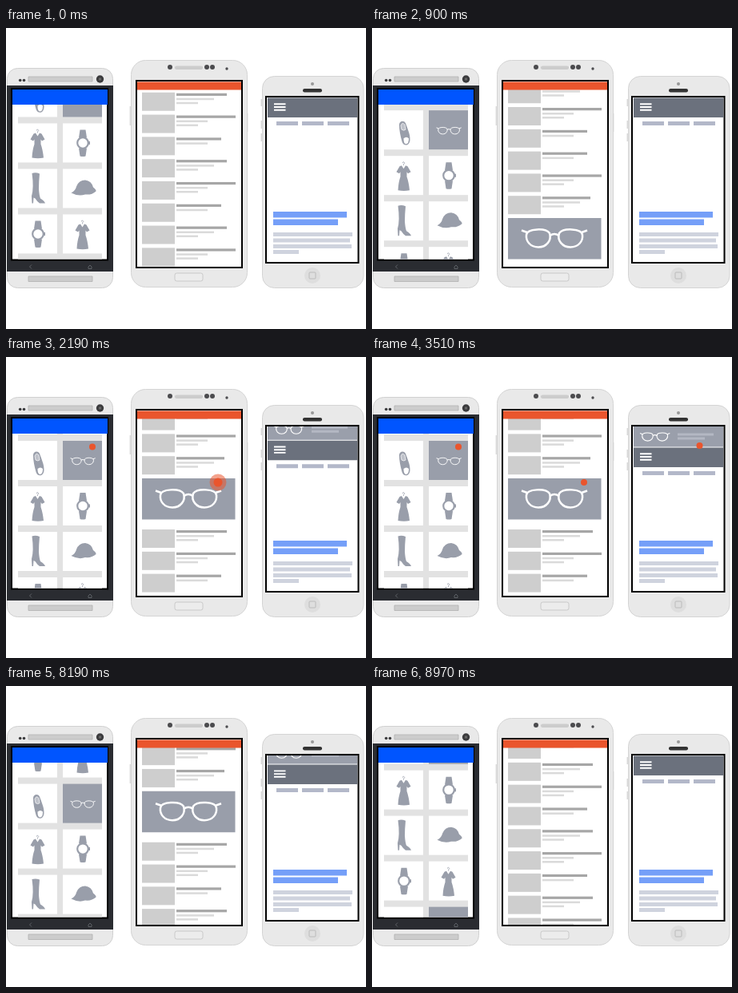
Recreate the animation shown at these times as an HTML page. Size 450 px wide and 377 px high, loop 9000 ms.

```html
<!DOCTYPE html>
<html lang="en">
<head>
<meta charset="utf-8">
<title>Three phones</title>
<style>
  html, body { margin: 0; width: 100%; height: 100%; overflow: hidden; background: #fff; }
  svg { display: block; width: 450px; height: 377px; }
</style>
</head>
<body>
<svg viewBox="0 0 450 377">
  <defs>
    <clipPath id="gridClip"><path d="M8 96H126V289.500H8Z"/></clipPath>
    <clipPath id="listClip"><path d="M164 77H294V299H164Z"/></clipPath>
    <clipPath id="pageClip"><path d="M326 87H439.500V293H326Z"/></clipPath>
    <g id="glasses" fill="none" stroke="#fff" stroke-width="2.500">
      <path d="M6 10C7 2 30 1 35 8C38 17 31 25.500 21 25.500C11 25.500 5 18 6 10ZM76 10C75 2 52 1 47 8C44 17 51 25.500 61 25.500C71 25.500 77 18 76 10Z"/>
      <path d="M35.500 11Q41 7 46.500 11M7 7L0 4.500M75 7L82 4.500"/>
    </g>
    <g id="dress" fill="#999eaa">
      <path d="M24.500 12V10.500Q27 9 24.500 7.500Q23 8 23.500 9" fill="none" stroke="#999eaa" stroke-width=".8"/>
      <path d="M19.500 13L22 12L24.500 16L27 12L29.500 13L33.500 20L30 22L28.500 20L28.500 26Q31 33 32 43Q25 44.500 17.500 43Q18 33 20.500 26L20.500 20L19 22L15.500 20Z"/>
    </g>
    <g id="watch" fill="#999eaa">
      <path d="M21.500 8H28.500L30 18H20ZM20 31H30L28.500 41Q25 42 21.500 41ZM32 22.500H34V26.500H32Z"/>
      <circle cx="25" cy="24.500" r="6.800" fill="#fff" stroke="#999eaa" stroke-width="2.200"/>
    </g>
    <path id="boot" fill="#999eaa" d="M17.500 5.500Q22 4 27 6Q26 16 26 25Q26.500 33 28 37Q33 40 34 43H27Q24 41 21.500 37L19.500 36L19 43H17.500L17 34Q20 24 17.500 5.500Z"/>
    <path id="cap" fill="#999eaa" d="M10.500 30Q16 27 17 22Q20 14 28 14Q36 15 38 23Q42 26 41.500 28Q36 33 28 32Q20 35 10.500 30Z"/>
    <g id="shoe">
      <path fill="#999eaa" d="M19 18C19 13 25 12 27 16C29 22 33 30 32.500 37C32 45 24 45 22.500 39C20.500 32 19 25 19 18Z"/>
      <path d="M21 19Q23 14 26 18L27 24Q25 26 22 24Z" fill="#bfc2ca" stroke="#fff" stroke-width=".7"/>
      <path d="M24.500 35Q28 32 31 35Q31 42 27.500 42Q24.500 42 24.500 35Z" fill="#fff"/>
    </g>
  </defs>

  <!-- left phone -->
  <rect x="1.500" y="50.500" width="132" height="275" rx="13" fill="#e9e9e9" stroke="#d0d0d0"/>
  <path d="M1 72H134V305H1Z" fill="#2a2c31"/>
  <g fill="#ccc" stroke="#b2b2b2" stroke-width=".8">
    <path d="M28 61H108V67H28ZM28 311H108V317.500H28Z"/>
  </g>
  <g fill="#3b3b3d">
    <circle cx="17.700" cy="65.500" r="1.800"/><circle cx="22.500" cy="65.500" r="1.800"/>
    <circle cx="117.500" cy="64" r="4.700"/><circle cx="117.500" cy="64" r="1.700" fill="#666"/>
  </g>
  <rect x="7" y="76" width="120" height="214.500" fill="#fff" stroke="#000" stroke-width="2"/>
  <path d="M32 296.500L29.500 299L32 301.500M103 299L105 297L107 299V301.500H103Z" fill="none" stroke="#64676d" stroke-width=".9"/>
  <g clip-path="url(#gridClip)">
    <path d="M15 96H120V290H15Z" fill="#e2e2e2"/>
    <g id="grid"></g>
  </g>
  <path d="M8 77H127V96H8Z" fill="#0055ff"/>

  <!-- middle phone -->
  <path d="M155.500 98V122M301.500 107V130" stroke="#dedede" stroke-width="2"/>
  <rect x="156.500" y="40.500" width="145" height="284" rx="18" fill="#e9e9e9" stroke="#d4d4d4"/>
  <rect x="211" y="47.500" width="35" height="4.500" rx="2.200" fill="#ccc"/>
  <g fill="#4b4b4e">
    <circle cx="205" cy="49" r="3"/><circle cx="251" cy="49" r="3"/>
    <circle cx="258" cy="49" r="3"/><circle cx="276" cy="51" r="1.700"/>
  </g>
  <rect x="211" y="307" width="35" height="10" rx="2.500" fill="#ececec" stroke="#c9c9c9"/>
  <rect x="163" y="66" width="132" height="234" fill="#fff" stroke="#000" stroke-width="2"/>
  <g clip-path="url(#listClip)"><g id="list"></g></g>
  <path d="M164 67.500H294V77.500H164Z" fill="#ea552d"/>

  <!-- right phone -->
  <path d="M319.500 89V98M319.500 116V126M319.500 132V142" stroke="#dadada" stroke-width="2"/>
  <rect x="320.500" y="60.500" width="126.500" height="265" rx="15" fill="#e9e9e9" stroke="#d4d4d4"/>
  <circle cx="383" cy="70" r="2" fill="#999"/>
  <rect x="371" y="76" width="24" height="4.500" rx="2.200" fill="#333"/>
  <circle cx="383" cy="310" r="10" fill="#dedede"/>
  <rect x="379" y="306" width="8" height="8" rx="1" fill="none" stroke="#bbb"/>
  <rect x="325" y="86" width="115.500" height="208" fill="#fff" stroke="#000" stroke-width="2"/>
  <g clip-path="url(#pageClip)">
    <path d="M334 230H426V237.500H334ZM334 239.500H415V247H334Z" fill="#759ff8"/>
    <path d="M334 256H433V261H334ZM334 263.500H430V268.500H334ZM334 271H432V276H334ZM334 278H366V283H334Z" fill="#cfd3de"/>
    <g id="advert">
      <path d="M327 87H439V112.500H327Z" fill="#9a9fab"/>
      <use href="#glasses" transform="translate(335 93.500) scale(.455)"/>
      <path d="M382 95.500H427V98.500H382ZM382 100.500H416V103.500H382Z" fill="#b4b8c3"/>
    </g>
    <g id="nav">
      <path d="M327 87.500H439.500V112H327Z" fill="#6b717d"/>
      <path d="M335 95.300H349.500M335 99H349.500M335 102.700H349.500" stroke="#fff" stroke-width="1.900"/>
      <path d="M338 117H365V122H338ZM370 117H397V122H370ZM402 117H429V122H402Z" fill="#b3b8c9"/>
    </g>
  </g>
  <g id="dots" fill="#ea552d"></g>
</svg>
<script>
const LOOP = 9000, GRID_LOOP = 228, ROW = 27.8, LIST_ROWS = 24;
const LIST_TOP = 64, LIST_LENGTH = LIST_TOP + ROW * LIST_ROWS;
const $ = id => document.getElementById(id);
const box = (x, y, w, h, fill) =>
  `<rect x="${x}" y="${y}" width="${w}" height="${h}" fill="${fill}"/>`;
const clamp = v => Math.min(1, Math.max(0, v));
const move = (el, x, y) => el.setAttribute('transform', `translate(${x} ${y})`);

function buildGrid() {
  const pairs = [['shoe', 'glasses'], ['dress', 'watch'], ['boot', 'cap'], ['watch', 'dress']];
  const card = (name, x, y) => {
    const wide = name === 'glasses';
    const place = wide ? `translate(${x + 9.500} ${y + 20}) scale(.38)` : `translate(${x} ${y})`;
    return box(x, y, 49, 49, wide ? '#999eaa' : '#fff') +
      `<use href="#${name}" transform="${place}"/>`;
  };
  let out = '';
  for (let i = -4; i < 8; i++) {
    const [left, right] = pairs[(i + 4) % 4], y = 105 + i * 57;
    out += card(left, 15, y) + card(right, 71, y);
  }
  return out;
}

function buildList() {
  const kinds = { a: [63, 47, 27], b: [74, 39, 27], c: [56, 39, 0], d: [60, 47, 27] };
  const item = (kind, y) => {
    const [title, first, second] = kinds[kind];
    return box(170, y, 41, 23, '#cecece') + box(213, y + 1, title, 3.200, '#a6a6a6') +
      box(213, y + 7, first, 2.500, '#dadada') + box(213, y + 12, second, 2.500, '#dadada');
  };
  const feature = y => box(170, y, 116.500, 51.500, '#999eaa') +
    `<use href="#glasses" transform="translate(187 ${y + 11})"/>`;
  const rows = (names, y) => [...names].map((kind, i) => item(kind, y + i * ROW)).join('');
  const before = 'cbd', after = 'abc', end = 152 + LIST_LENGTH;
  const middle = after.repeat(LIST_ROWS / 3 - 1) + before;
  return rows(before, 152 - 3 * ROW) + feature(152) + rows(middle, 152 + LIST_TOP) +
    feature(end) + rows(after, end + LIST_TOP);
}

// Each step is [time, value, speed]; values between follow a Hermite curve.
const gridSteps = [[7320, 0, 0], [8520, 46, .115], [8985, 178, .46], [9510, 407, .25], [10100, 456, 0]];
const listSteps = [[7320, 0, 0], [8520, 53, .1325], [8985, 210.5, .5], [9510, 517.5, .45],
  [10380, LIST_LENGTH - 18, .09], [10860, LIST_LENGTH, 0]];
const navSteps = [[7320, 26, 0], [8520, 3.5, -.02], [8940, 0, 0], [10500, 0, 0],
  [11080, 13, .04], [11640, 26, 0]];

function follow(steps, t) {
  if (t <= steps[0][0]) return steps[0][1];
  const i = steps.findIndex(s => t < s[0]);
  if (i < 0) return steps[steps.length - 1][1];
  const [t0, p0, v0] = steps[i - 1], [t1, p1, v1] = steps[i];
  const h = t1 - t0, u = (t - t0) / h, w = 1 - u;
  return p0 * w * w * (1 + 2 * u) + v0 * h * u * w * w +
    p1 * u * u * (3 - 2 * u) - v1 * h * u * u * w;
}

const taps = [[108, 112.500, 1000], [265, 157, 1940], [409.500, 111, 2610]].map(([x, y, start]) => {
  const circles = [0, 1].map(() => {
    const c = document.createElementNS('http://www.w3.org/2000/svg', 'circle');
    c.setAttribute('cx', x);
    c.setAttribute('cy', y);
    return $('dots').appendChild(c);
  });
  return { circles, start };
});

function drawTap({ circles: [ripple, dot], start }, t) {
  const u = clamp((t - start) / 900), leave = clamp((t - 7320) / 300);
  const pop = u < .4 ? 6.200 * Math.sin(u / .4 * Math.PI / 2) : 6.200 - 2.200 * (u - .4) / .6;
  dot.setAttribute('r', pop * (1 - leave));
  ripple.setAttribute('r', 27 * (1 - (1 - u) ** 1.500));
  ripple.setAttribute('opacity', u > 0 ? .75 * (1 - u) : 0);
}

$('grid').innerHTML = buildGrid();
$('list').innerHTML = buildList();

function draw(now) {
  const t = now % LOOP, run = t < 7320 ? t + LOOP : t;
  move($('grid'), 0, follow(gridSteps, run) % GRID_LOOP);
  move($('list'), 0, -follow(listSteps, run));
  const drop = follow(navSteps, run);
  move($('nav'), 0, drop);
  move($('advert'), 0, drop - 26);
  taps.forEach(tap => drawTap(tap, t));
}

const began = performance.now();
function tick() {
  draw(performance.now() - began);
  requestAnimationFrame(tick);
}
tick();
</script>
</body>
</html>
```
